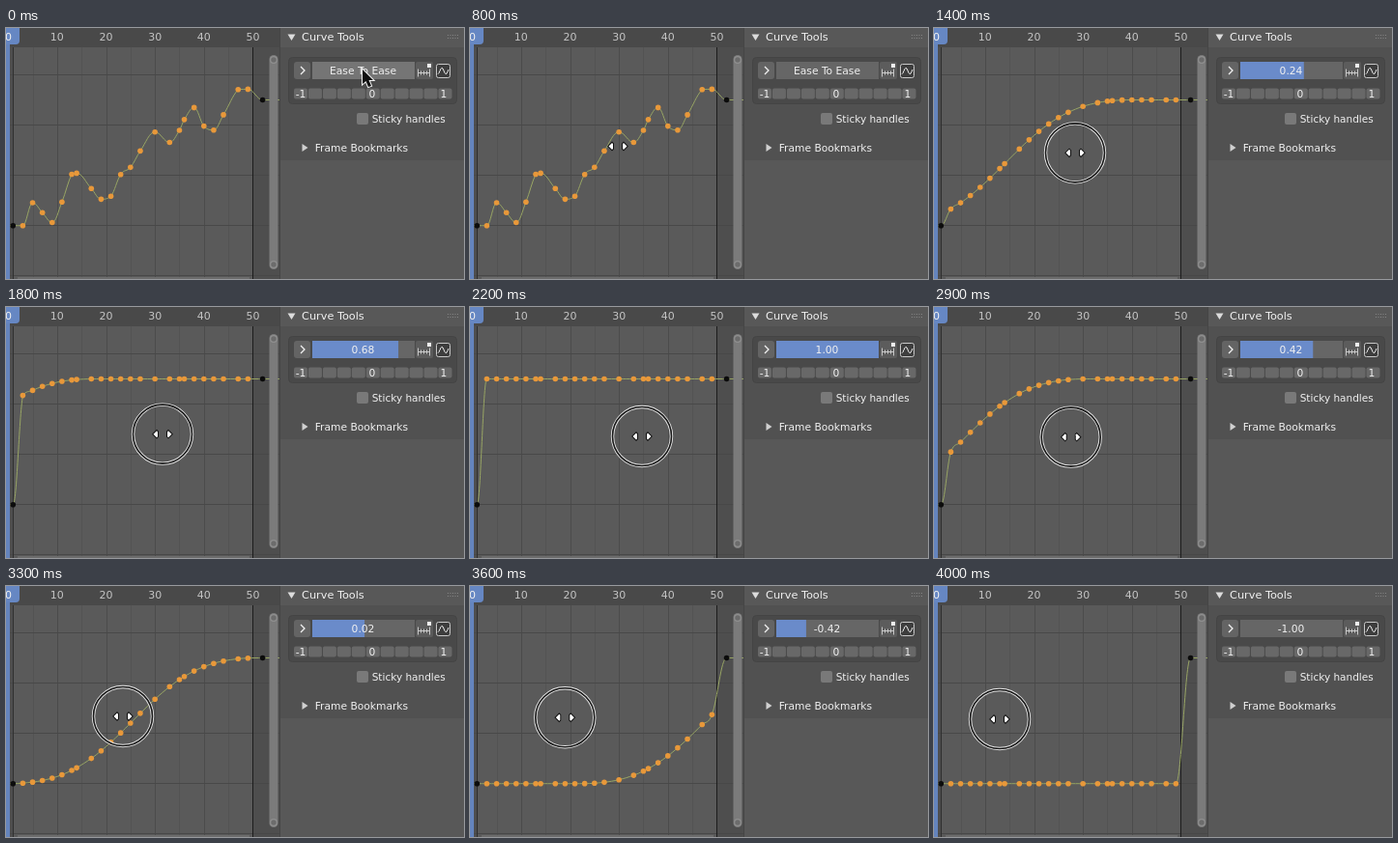
Animation of 474x260 px, one loop 4.1 s. Source, as an HTML page with a canvas:

```html
<!DOCTYPE html>
<html>
<head>
<meta charset="utf-8">
<style>
  html, body { margin: 0; width: 100%; height: 100%; overflow: hidden; background: #585858; }
  canvas { display: block; width: 474px; height: 260px; }
</style>
</head>
<body>
<canvas id="stage" width="474" height="260"></canvas>
<script>
const ctx = document.getElementById('stage').getContext('2d');
const LOOP = 4100, STEP = 100, GRAB = 300, PRESS = 1000;
const BOTTOM = 204.7, TOP = 74.5, FIRST = 1, LAST = 52;
const LIGHT = '#f0f0f0';

// Turning points of the untouched curve: [frame, y]
const turns = [
  [3, BOTTOM], [5, 181], [9, 201.5], [13.5, 150], [20, 179], [24, 147],
  [30, 107.7], [33, 118.5], [38, 82.4], [41, 108], [48, 61.5], [LAST, TOP]
];
// Drag of the pointer [ms, x, y] and of the slider [ms, value]
const pointer = [[200, 369, 43], [800, 153, 122.5], [1000, 130, 127], [2200, 178, 134], [3300, 121, 135], [4000, 68, 138]];
const slider = [[1180, 0], [2200, 1.12], [3300, 0.02], [4000, -1]];

const linear = k => k;
const smooth = k => (1 - Math.cos(Math.PI * k)) / 2;
const clamp = (v, lo, hi) => Math.min(hi, Math.max(lo, v));
const frameX = f => 2.2 + f * 5.065;

function sample(path, at, col = 1, easing = linear) {
  const i = clamp(path.findIndex(p => p[0] >= at), 1, path.length - 1);
  const a = path[i - 1], b = path[i];
  return a[col] + (b[col] - a[col]) * easing(clamp((at - a[0]) / (b[0] - a[0]), 0, 1));
}

// Keys sit on every second frame, counted afresh from each start
function keyFrames() {
  const starts = [FIRST, 13, 14, 17, 30, 33, 35, 36, 47, LAST];
  return starts.flatMap((start, i) => {
    const run = [start];
    for (let f = start + 2; f <= starts[i + 1] - 2; f += 2) run.push(f);
    return run;
  });
}
const frames = keyFrames();

function sCurve(x) {
  const k = clamp(x, 0, 1);
  return k * k / (k * k + (1 - k) * (1 - k));
}

function keyY(f, t, value) {
  if (f === FIRST) return BOTTOM;
  if (f === LAST) return TOP;
  if (t < PRESS) return sample(turns, f, 1, smooth);
  return BOTTOM + (TOP - BOTTOM) * sCurve((f - FIRST) / (LAST - FIRST) + value);
}

function rect(x, y, w, h, color) {
  ctx.fillStyle = color;
  ctx.fillRect(x, y, w, h);
}

function round(x, y, w, h, r, fill, stroke) {
  ctx.beginPath();
  ctx.roundRect(x, y, w, h, r);
  ctx.fillStyle = fill;
  ctx.fill();
  if (stroke) line(stroke, 1);
}

function line(color, width) {
  ctx.strokeStyle = color;
  ctx.lineWidth = width;
  ctx.stroke();
}

function dot(x, y, r, color) {
  ctx.beginPath();
  ctx.arc(x, y, r, 0, 7);
  ctx.fillStyle = color;
  ctx.fill();
}

function shape(points, x, y, fill, outline) {
  ctx.beginPath();
  points.forEach(p => ctx.lineTo(x + p[0], y + p[1]));
  ctx.closePath();
  if (outline) line(outline, 2);
  ctx.fillStyle = fill;
  ctx.fill();
}

function text(str, x, y, align = 'left', size = 10.7, color = LIGHT) {
  ctx.font = size + 'px "DejaVu Sans", sans-serif';
  ctx.textAlign = align;
  ctx.fillStyle = color;
  ctx.fillText(str, x, y);
}

function drawGrid() {
  rect(0, 0, 284, 260, '#4e4e4e');
  rect(7, 20, 248, 240, '#5a5a5a');
  for (let f = 5; f < 50; f += 5) {
    rect(Math.round(frameX(f)), 20, 1, 240, f % 10 ? '#535353' : '#4b4b4b');
  }
  for (let y = 48; y < 260; y += 52) rect(0, y, 284, 1, '#484848');
  rect(7, 20, 1, 240, '#303030');
  rect(255, 20, 1, 240, '#1c1c1c');
  rect(12, 258, 240, 2, '#6c6c6c');
  rect(0, 0, 284, 20, '#494949');
  for (let f = 10; f <= 50; f += 10) text(f, frameX(f), 13, 'center', 11, '#c4c4c4');
}

function drawCurve(t, value) {
  const points = frames.map(f => [frameX(f), keyY(f, t, value)]);
  const last = points.length - 1;
  // Flat at peaks and ends, otherwise parallel to the neighbours' chord
  const slopes = points.map(([, y], i) => {
    if (!i || i === last) return 0;
    const [px, py] = points[i - 1], [nx, ny] = points[i + 1];
    return (y - py) * (ny - y) <= 0 ? 0 : (ny - py) / (nx - px);
  });

  ctx.beginPath();
  ctx.moveTo(0, BOTTOM);
  ctx.lineTo(...points[0]);
  for (let i = 0; i < last; i++) {
    const [x0, y0] = points[i], [x1, y1] = points[i + 1];
    const h = (x1 - x0) * 0.39, lo = Math.min(y0, y1), hi = Math.max(y0, y1);
    ctx.bezierCurveTo(
      x0 + h, clamp(y0 + slopes[i] * h, lo, hi),
      x1 - h, clamp(y1 - slopes[i + 1] * h, lo, hi), x1, y1);
  }
  ctx.lineTo(284, TOP);
  line('#98a564', 1);
  points.forEach(([x, y], i) => dot(x, y, 2.8, i && i < last ? '#e8983a' : '#0c0c0c'));
}

function drawPlayhead() {
  rect(0, 16, 4, 244, '#6484bd');
  round(-10, -4, 24, 21, 4, '#6687c3');
  text('0', 2.5, 13, 'center', 11);
}

function drawScrollbar() {
  round(272.5, 28, 9, 222, 4.5, '#7b7b7b');
  for (const y of [33, 245]) {
    dot(277, y, 4, '#8f8f8f');
    dot(277, y, 2.7, '#6c6c6c');
  }
}

function drawIcons() {
  round(424, 35, 18, 18, 2, '#5c5c5c');
  rect(426, 46, 13, 1, '#c8c8c8');
  for (let i = 0; i < 5; i++) {
    const h = i % 4 ? 4 : 8;
    rect(426 + i * 3, 46.5 - h / 2, 1, h, '#c8c8c8');
  }
  rect(436, 37, 4, 4, LIGHT);

  round(445.5, 37.5, 14, 14, 2, '#3d3d3d', '#c8c8c8');
  ctx.beginPath();
  for (let x = 0; x <= 11; x++) ctx.lineTo(447 + x, 44.5 - 3.2 * Math.sin((x - 2) * 0.75));
  line(LIGHT, 1);
}

function drawPanel(t, value) {
  rect(284, 0, 190, 260, '#585858');
  rect(284, 20, 190, 117, '#515151');
  rect(283, 0, 1, 260, '#454545');

  shape([[-4, -3], [4, -3], [0, 3.5]], 295.5, 9.5, '#dcdcdc');
  text('Curve Tools', 306, 13, 'left', 11.3);
  for (let i = 0; i < 10; i++) rect(457 + (i >> 1) * 2.5, i % 2 ? 10 : 7, 1, 1, '#858585');

  round(292.5, 30.5, 174, 48, 4, '#494949', '#444444');
  round(298, 35, 17, 18, 3, '#646464');
  ctx.beginPath();
  ctx.moveTo(305, 40);
  ctx.lineTo(309, 44);
  ctx.lineTo(305, 48);
  line(LIGHT, 1.3);

  const active = t >= PRESS;
  rect(317, 35, 106, 18, t < GRAB ? '#757575' : '#666666');
  if (active) rect(317, 35, 53 * (value + 1), 18, '#6a8bca');
  text(active ? value.toFixed(2) : 'Ease To Ease', 369.5, 48, 'center');
  drawIcons();

  for (let i = 0; i < 11; i++) round(298 + i * 14.95, 62.5, 14, 11, 2, '#686868');
  for (const n of [-1, 0, 1]) text(n, 379 + n * 74, 72, 'center');

  round(363, 88, 12, 12, 2, '#797979');
  text('Sticky handles', 378.7, 98, 'left', 10.5);
  shape([[-3, -4], [3, 0], [-3, 4]], 309.5, 124, '#d0d0d0');
  text('Frame Bookmarks', 319.7, 128);
}

function drawPointer(t) {
  const x = sample(pointer, t, 1), y = sample(pointer, t, 2);
  if (t < GRAB) {
    shape([[0, 0], [0, 15], [3.5, 12], [6, 18], [9, 17], [6.5, 11], [11, 11]], x, y, '#101010', LIGHT);
    return;
  }
  if (t >= PRESS) {
    ctx.beginPath();
    ctx.arc(x, y, 30.5, 0, 7);
    line('#e4e4e4', 3.4);
    line('#181818', 1.6);
  }
  for (const side of [-1, 1]) {
    const arrow = [[9.5, 0], [6, -3.5], [5, -2.5], [5, 2.5], [6, 3.5]];
    shape(arrow.map(p => [side * p[0], p[1]]), x, y, '#ffffff', '#111111');
  }
}

function draw(t) {
  const value = clamp(sample(slider, t), -1, 1);
  drawGrid();
  drawCurve(t, value);
  drawPlayhead();
  drawScrollbar();
  drawPanel(t, value);
  drawPointer(t);
}

const start = performance.now();
function tick() {
  const t = Math.max(0, performance.now() - start) % LOOP;
  draw(Math.floor(t / STEP) * STEP);
  requestAnimationFrame(tick);
}
tick();
</script>
</body>
</html>
```
